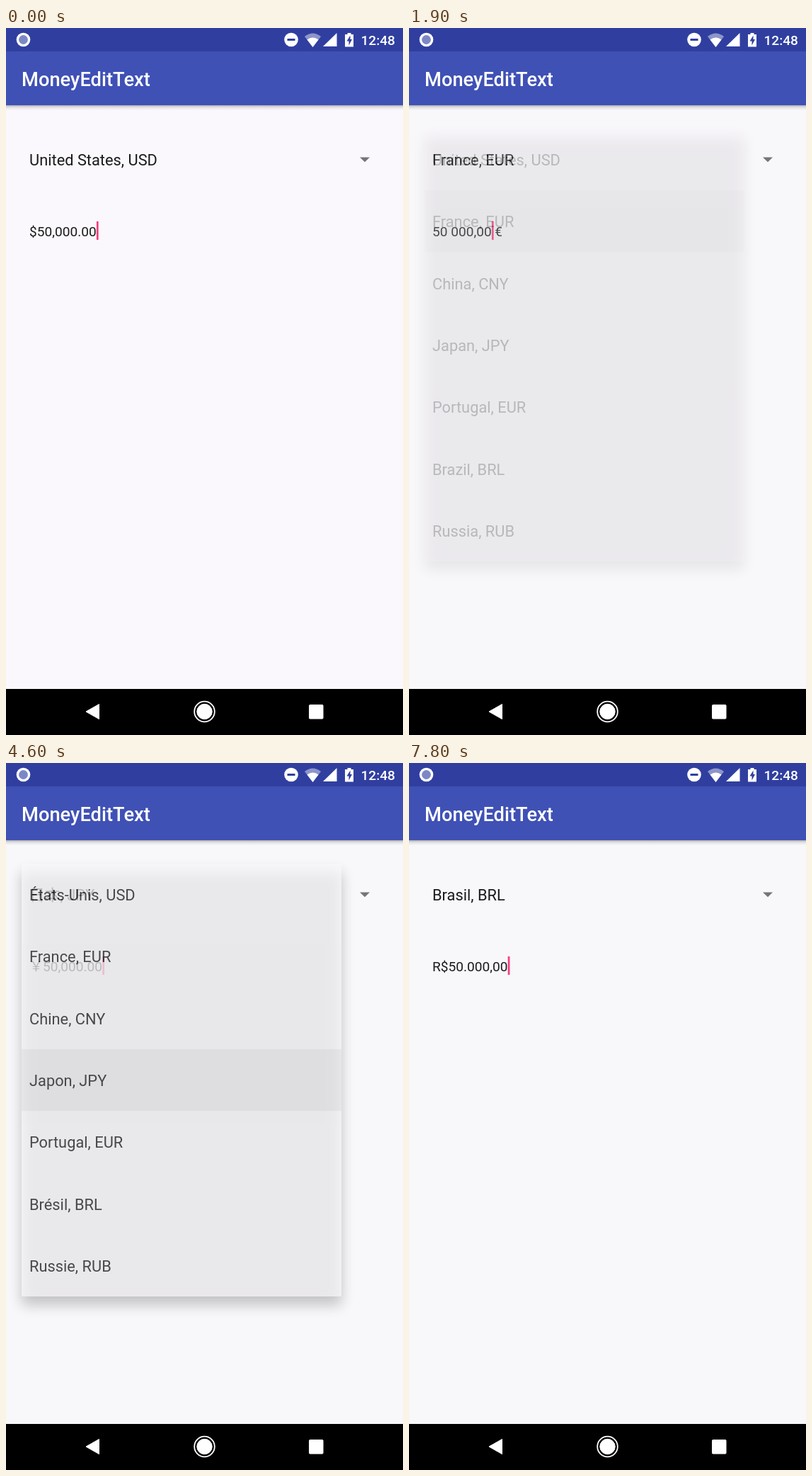
Recreate the animation shown at these times as an HTML page. Size 561 px wide and 998 px high, loop 8000 ms.

```html
<!DOCTYPE html>
<html lang="ja">
<head>
<meta charset="utf-8">
<title>MoneyEditText</title>
<style>
  html, body { margin: 0; width: 100%; height: 100%; overflow: hidden; }
  svg { display: block; width: 100vw; height: 100vh; }
  text { font-family: Roboto, "Noto Sans CJK JP", "Noto Sans CJK", sans-serif; white-space: pre; }
  .item { font-size: 21.82px; fill: #1b1b1c; }
  .money { font-size: 19.1px; fill: #1b1b1c; }
  .bar { font-weight: 500; fill: #fff; }
</style>
</head>
<body>
<svg viewBox="0 0 561 998" preserveAspectRatio="none">
  <defs>
    <linearGradient id="drop" x2="0" y2="1">
      <stop stop-color="#000" stop-opacity=".3"/>
      <stop offset=".4" stop-color="#000" stop-opacity=".1"/>
      <stop offset="1" stop-color="#000" stop-opacity="0"/>
    </linearGradient>
    <filter id="soft" filterUnits="userSpaceOnUse" x="-40" y="90" width="640" height="760">
      <feGaussianBlur id="blur" stdDeviation="10"/>
    </filter>
    <clipPath id="clip"><rect id="window" rx="2"/></clipPath>
  </defs>

  <rect id="page" width="561" height="998"/>
  <rect y="109" width="561" height="7" fill="url(#drop)"/>
  <rect y="33" width="561" height="76" fill="#3f51b5"/>
  <rect width="561" height="33" fill="#303f9f"/>
  <text class="bar" x="22" y="81.5" font-size="27.3">MoneyEditText</text>
  <text class="bar" x="501.5" y="24" font-size="19.1">12:48</text>

  <g fill="#fff">
    <circle cx="24.5" cy="16.5" r="9.8"/>
    <circle cx="24.5" cy="16.5" r="6.4" fill="#7c88c6"/>
    <circle cx="403" cy="16.5" r="9.8"/>
    <rect x="397.5" y="15" width="11" height="3" fill="#303f9f"/>
    <path d="M433.5 27L422 12Q433.5 3 445 12Z" opacity=".45"/>
    <path d="M433.5 27L425.5 16.5Q433.5 10.5 441.500 16.5Z"/>
    <path d="M448 26H467.500V7Z"/>
    <path d="M479 9H482.500V7H487.500V9H491V26.500H479Z"/>
    <path d="M486.500 10.500L481.500 18.500H484.500V24.500L489 16H486.500Z" fill="#303f9f"/>
  </g>

  <circle id="ripple" cx="506" cy="185.500"/>
  <path d="M500 182.500H514L507 189.300Z" fill="#757575"/>
  <text id="country" class="item" x="33" y="194"/>
  <text id="money" class="money" x="33" y="294"/>
  <rect id="caret" y="273" width="2.700" height="26" fill="#f83c7c"/>

  <rect id="shadow" filter="url(#soft)"/>
  <g id="panel" clip-path="url(#clip)">
    <g id="sheet">
      <rect x="22" y="142" width="452" height="611" fill="#f8f7fa"/>
      <rect id="press" x="22" width="452" height="87.300"/>
      <g id="rows"></g>
    </g>
  </g>
  <circle id="touch" r="15.300" fill="#fff" fill-opacity=".65" stroke="#b4c0e4" stroke-width="1.600"/>

  <rect y="933" width="561" height="65"/>
  <g fill="#fff" stroke="#fff" stroke-linejoin="round">
    <path d="M113 965L131.500 954.500V975.500Z"/>
    <circle cx="280.500" cy="965" r="10.700"/>
    <circle cx="280.500" cy="965" r="14.300" fill="none" stroke-width="1.800"/>
    <rect x="428.500" y="955.500" width="19.500" height="19.500" rx="1"/>
  </g>
</svg>
<script>
const LOOP = 8000, STEP = 100, ROW = 87.3;
const TOP = 142, FULL = 611, LEFT = 22, WIDTH = 452;

// Amounts are split where the caret stands.
const choices = [
  { at: 0, name: "United States, USD", money: ["$50,000.00", ""] },
  { at: 1800, name: "France, EUR", money: ["50\u00a0000,00", "\u00a0€"] },
  { at: 4600, name: "日本, JPY", money: ["￥50,000.00", ""] },
  { at: 7600, name: "Brasil, BRL", money: ["R$50.000,00", ""] }
];

// tap: press on the spinner, open: menu starts to unfold, pick: press on a row
const menus = [
  { tap: 400, open: 555, pick: 1500, row: 1, from: 0,
    names: "United States,France,China,Japan,Portugal,Brazil,Russia" },
  { tap: 3000, open: 3255, pick: 4300, row: 3, from: 1,
    names: "États-Unis,France,Chine,Japon,Portugal,Brésil,Russie" },
  { tap: 6000, open: 6155, pick: 7300, row: 5, from: 3,
    names: "アメリカ合衆国,フランス,中国,日本,ポルトガル,ブラジル,ロシア" }
];
const codes = ["USD", "EUR", "CNY", "JPY", "EUR", "BRL", "RUB"];

const el = id => document.getElementById(id);
const set = (id, attrs) => {
  for (const key in attrs) el(id).setAttribute(key, attrs[key]);
};
const clamp = v => Math.min(1, Math.max(0, v));
const mix = (a, b, p) => a + (b - a) * p;

// Cubic easing with control points (x1, 0) and (.2, 1)
function ease(x1, t) {
  let lo = 0, hi = 1;
  for (let i = 0; i < 24; i++) {
    const s = (lo + hi) / 2, r = 1 - s;
    if (3 * s * r * r * x1 + 3 * s * s * r * 0.2 + s ** 3 < t) lo = s; else hi = s;
  }
  return lo * lo * (3 - 2 * lo);
}

function drawField(t) {
  const now = choices.filter(c => c.at <= t).pop();
  const [before, after] = now.money;
  el("country").textContent = now.name;
  el("money").textContent = before + after;
  set("caret", {
    x: 33.3 + el("money").getSubStringLength(0, before.length),
    opacity: Math.floor((t - now.at) / 500) % 2 ? 0 : 1
  });
}

function drawMenu(t, menu) {
  const part = clamp((t - menu.open) / 250);
  const px = ease(0, part), py = ease(0.4, part);
  const alpha = px * (1 - clamp((t - menu.pick - 245) / 200));
  const x = LEFT + 33 * (1 - px);
  const height = mix(ROW, FULL, py);
  const shift = -ROW * 3 * (1 - py);

  set("window", { x, y: TOP, width: WIDTH, height });
  set("shadow", { x, y: TOP + 1 + 11 * py, width: WIDTH, height, opacity: 0.3 * alpha });
  set("blur", { stdDeviation: 1.5 + 8 * py });
  set("panel", { opacity: alpha });
  set("sheet", { transform: `translate(${x - LEFT} ${shift})` });
  set("press", { y: TOP + menu.row * ROW, opacity: 0.055 * clamp((t - menu.pick) / 200) });
  el("rows").innerHTML = menu.names.split(",").map((name, i) =>
    `<text class="item" x="33" y="${194 + i * 87.35}">${name}, ${codes[i]}</text>`).join("");
}

function drawTouch(t, menu) {
  const since = t - menu.tap, picked = t - menu.pick;
  const onSpinner = since >= 0 && since < 200;
  const onRow = picked >= 0 && picked < 300;
  set("touch", {
    cx: onRow ? 147 : 490,
    cy: onRow ? 201.7 + menu.row * ROW : 190,
    opacity: onSpinner || onRow ? 1 : 0
  });
  set("ripple", {
    r: 25 * clamp(since / 200),
    opacity: 0.07 * (1 - clamp((t - menu.open - 45) / 400))
  });
}

function draw(ms) {
  const t = Math.floor(ms % LOOP / STEP) * STEP;
  const menu = menus.filter(m => m.tap <= t).pop() || menus[0];
  set("page", { fill: t < 400 ? "#faf8fc" : "#f8f7fa" });
  drawField(t);
  drawMenu(t, menu);
  drawTouch(t, menu);
}

let start;
function tick(now) {
  start ??= now;
  draw(now - start);
  requestAnimationFrame(tick);
}
draw(0);
requestAnimationFrame(tick);
</script>
</body>
</html>
```
